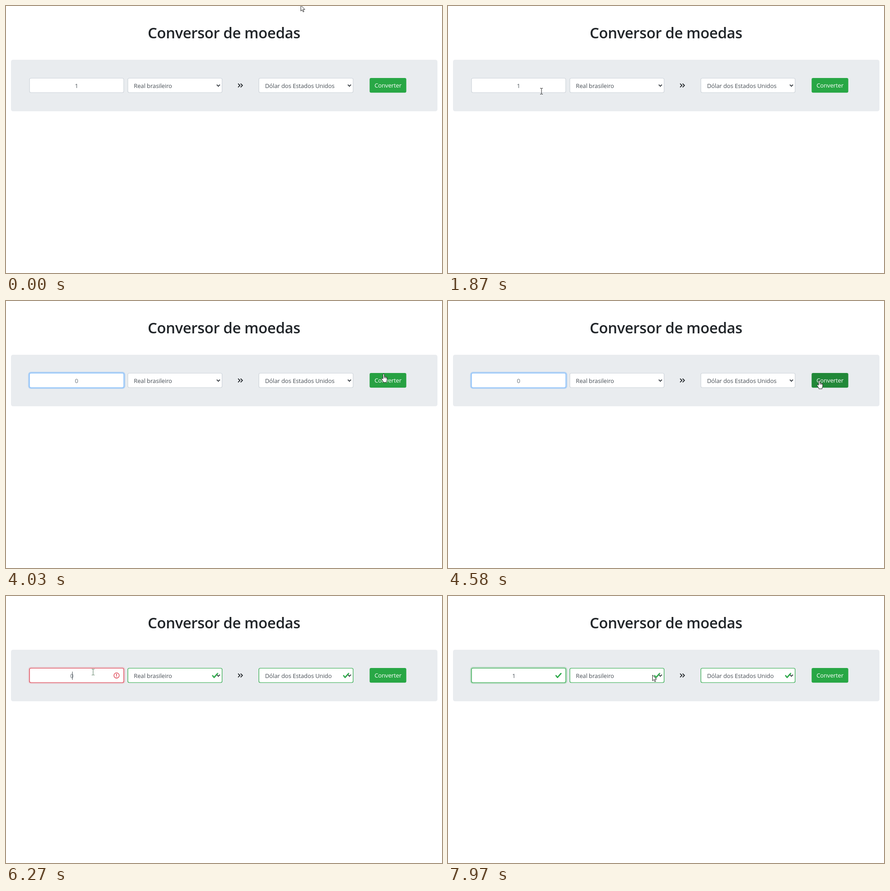
These frames come from a looping animation (956x586 px, 8000 ms). An HTML page:

```html
<!DOCTYPE html>
<html lang="pt-BR">
<head>
<meta charset="utf-8">
<title>Conversor de moedas</title>
<style>
html, body { margin: 0; width: 100%; height: 100%; overflow: hidden; background: #fff; }
svg { display: block; width: 100vw; height: 100vh; }
text { font: 13px "Open Sans", "Noto Sans", sans-serif; letter-spacing: -.13px; fill: #495057; }
.mid { text-anchor: middle; }
.title { font-size: 32.5px; font-weight: 550; letter-spacing: -.35px; fill: #212529; }
.hint { fill: #6c757d; }
.box { fill: #fff; stroke: #ced4da; stroke-width: 1.2; }
.line { fill: none; stroke: #343a40; stroke-width: 1.9; }
.halo { fill: none; stroke-width: 2.8; }

.anim, .hard { animation: 8s linear infinite; }
.hard { animation-timing-function: step-end; }

/* Form states: 1% is 80 ms */
.amount { animation-name: amount; }
@keyframes amount {
  0%, 25.9% { stroke: #ced4da; }
  28%, 57.2% { stroke: #80bdff; }
  59% { stroke: #ced4da; }
  60.7%, 88.4% { stroke: #dc3545; }
  90.3%, 100% { stroke: #28a745; }
}
.ring { animation-name: ring; }
@keyframes ring {
  0%, 25.9% { stroke: rgba(0,123,255,0); }
  28%, 57.2% { stroke: rgba(0,123,255,.25); }
  59% { stroke: rgba(0,123,255,0); }
  77.4% { stroke: rgba(220,53,69,0); }
  79%, 88.4% { stroke: rgba(220,53,69,.25); }
  90.3%, 100% { stroke: rgba(40,167,69,.25); }
}
.select { animation-name: select; }
@keyframes select {
  0%, 59% { stroke: #ced4da; }
  60.7%, 100% { stroke: #28a745; }
}
.button { fill: #28a745; animation-name: button; }
@keyframes button {
  0%, 50% { fill: #28a745; }
  52%, 57.2% { fill: #218838; }
  58.8% { fill: #1e7e34; }
  60.7%, 69% { fill: #218838; }
  70.9%, 100% { fill: #28a745; }
}
.glow { stroke: rgba(72,180,97,.5); animation-name: glow; }
@keyframes glow {
  0%, 57.2% { opacity: 0; }
  59.1%, 77.4% { opacity: 1; }
  78.3%, 100% { opacity: 0; }
}

/* Values and icons that switch at once */
.first { animation-name: first; }
@keyframes first { 0% { opacity: 1; } 42%, 100% { opacity: 0; } }
.empty { animation-name: empty; }
@keyframes empty { 0% { opacity: 0; } 42% { opacity: 1; } 59%, 100% { opacity: 0; } }
.invalid { animation-name: invalid; }
@keyframes invalid { 0% { opacity: 0; } 59% { opacity: 1; } 88.5%, 100% { opacity: 0; } }
.valid { animation-name: valid; }
@keyframes valid { 0% { opacity: 0; } 88.5%, 100% { opacity: 1; } }
.checked { animation-name: checked; }
@keyframes checked { 0% { opacity: 0; } 59%, 100% { opacity: 1; } }
.cut { animation-name: cut; }
@keyframes cut { 0% { fill-opacity: 1; } 59%, 100% { fill-opacity: 0; } }

.caret { fill: #495057; animation-name: caret; }
@keyframes caret {
  0% { opacity: 0; transform: translate(158px,166px); }
  26.5% { opacity: 1; transform: translate(158px,166px); }
  33.5% { opacity: 0; transform: translate(158px,166px); }
  39.25% { opacity: 1; transform: translate(158px,166px); }
  42% { opacity: 1; transform: translate(155px,166px); }
  47% { opacity: 0; transform: translate(155px,166px); }
  53.875% { opacity: 1; transform: translate(155px,166px); }
  57.25% { opacity: 0; transform: translate(145px,166px); }
  77.6% { opacity: 1; transform: translate(145px,166px); }
  84.375% { opacity: 0; transform: translate(145px,166px); }
  88.5% { opacity: 1; transform: translate(148px,166px); }
  95.5%, 100% { opacity: 0; transform: translate(148px,166px); }
}

/* Pointer */
.pointer { animation-name: move; }
@keyframes move {
  0% { transform: translate(646px,-2px); }
  15.5% { transform: translate(640px,4px); }
  16.375% { transform: translate(618px,20px); }
  17.25% { transform: translate(575px,52px); }
  18.125% { transform: translate(515px,92px); }
  19% { transform: translate(445px,130px); }
  19.875% { transform: translate(375px,163px); }
  20.75% { transform: translate(315px,186px); }
  21.625% { transform: translate(262px,197px); }
  22.5% { transform: translate(228px,193px); }
  23.375% { transform: translate(205px,187px); }
  24.25% { transform: translate(196px,181px); }
  25.125% { transform: translate(193px,178px); }
  44.5% { transform: translate(230px,240px); }
  45.375% { transform: translate(350px,385px); }
  46.25% { transform: translate(490px,403px); }
  47% { transform: translate(583px,176px); }
  49.5% { transform: translate(901px,172px); }
  50.375% { transform: translate(828px,160px); }
  51.25% { transform: translate(822px,164px); }
  52.125% { transform: translate(818px,169px); }
  53% { transform: translate(816px,172px); }
  53.875% { transform: translate(815px,174px); }
  54.75% { transform: translate(814px,174px); }
  69% { transform: translate(800px,215px); }
  69.875% { transform: translate(740px,300px); }
  70.75% { transform: translate(640px,375px); }
  71.625% { transform: translate(520px,393px); }
  72.5% { transform: translate(400px,350px); }
  73.375% { transform: translate(285px,262px); }
  74.25% { transform: translate(186px,182px); }
  75.125% { transform: translate(191px,167px); }
  91.125% { transform: translate(194px,171px); }
  92% { transform: translate(203px,181px); }
  92.875% { transform: translate(222px,197px); }
  93.75% { transform: translate(255px,209px); }
  94.625% { transform: translate(300px,214px); }
  95.5% { transform: translate(345px,213px); }
  96.25% { transform: translate(388px,209px); }
  97.125% { transform: translate(412px,192px); }
  97.875% { transform: translate(429px,178px); }
  98.75% { transform: translate(441px,175px); }
  99.625%, 100% { transform: translate(448px,173px); }
}
.arrow { animation-name: arrow; }
@keyframes arrow {
  0%, 44.5%, 69% { opacity: 1; }
  23.375%, 50.375%, 74.25% { opacity: 0; }
  92.875%, 100% { opacity: 1; }
}
.beam { fill: none; animation-name: beam; }
@keyframes beam {
  0% { opacity: 0; stroke: #222; }
  23.375% { opacity: 1; stroke: #222; }
  44.5% { opacity: 0; stroke: #222; }
  74.25% { opacity: 1; stroke: #557a5c; }
  92.875%, 100% { opacity: 0; stroke: #557a5c; }
}
.hand { animation-name: hand; }
@keyframes hand {
  0% { opacity: 0; }
  50.375% { opacity: 1; }
  69%, 100% { opacity: 0; }
}
.shape { fill: #fff; stroke: #222; stroke-linejoin: round; }
</style>
</head>
<body>
<svg viewBox="0 0 956 586">
  <defs>
    <path id="check" fill="#28a745" transform="scale(1.94)" d="M2.3 6.73L.6 4.53c-.4-1.04.46-1.4 1.1-.8l1.1 1.4 3.4-3.8c.6-.63 1.6-.27 1.2.7l-4 4.6c-.43.5-.8.4-1.1.1z"/>
    <path id="down" class="line" d="M-3.5-1.8L0 1.7l3.5-3.5"/>
  </defs>

  <text class="title mid" x="478" y="71">Conversor de moedas</text>
  <rect x="11" y="118" width="935" height="113" rx="4.3" fill="#e9ecef"/>

  <rect class="halo anim ring" x="50" y="157" width="210" height="34.4" rx="4.5"/>
  <rect class="box anim amount" x="51.6" y="158.5" width="206.6" height="31.5" rx="3"/>
  <text class="mid hard first" x="154.6" y="180">1</text>
  <text class="mid hint hard empty" x="154.6" y="180">0</text>
  <g class="hard invalid">
    <text class="mid hint" x="144.5" y="180">0</text>
    <g transform="translate(234.7 166.7) scale(1.29)" fill="none" stroke="#dc3545">
      <circle cx="6" cy="6" r="4.5"/>
      <path stroke-linejoin="round" d="M5.8 3.6h.4L6 6.5z"/>
      <circle cx="6" cy="8.2" r=".6" fill="#dc3545" stroke="none"/>
    </g>
  </g>
  <g class="hard valid">
    <text class="mid" x="144.5" y="180">1</text>
    <use href="#check" x="234.6" y="166.7"/>
  </g>
  <rect class="hard caret" width="1" height="18"/>

  <rect class="box anim select" x="267.2" y="158.5" width="206.6" height="31.5" rx="3"/>
  <text x="280.3" y="180">Real brasileiro</text>
  <use href="#down" x="465.6" y="174.5"/>
  <use class="hard checked" href="#check" x="450.7" y="166.7"/>

  <path class="line" style="stroke:#212529" d="M508.9 170.3l4 4-4 4M514.4 170.3l4 4-4 4"/>

  <rect class="box anim select" x="554.5" y="158.5" width="206.6" height="31.5" rx="3"/>
  <text x="568" y="180">Dólar dos Estados Unido<tspan class="hard cut">s</tspan></text>
  <use href="#down" x="753" y="174.5"/>
  <use class="hard checked" href="#check" x="738" y="166.7"/>

  <rect class="halo anim glow" x="796" y="156.8" width="83" height="34.8" rx="4.5"/>
  <rect class="anim button" x="797.3" y="158.1" width="80.4" height="32.2" rx="3.3"/>
  <text class="mid" x="837.5" y="179.4" style="fill:#fff">Converter</text>

  <g class="hard pointer">
    <path class="shape hard arrow" d="M.5.5v12.6l2.9-2.7 2.1 4.7 1.9-.9-2-4.5h4z"/>
    <path class="hard beam" d="M-3-6.5h2.2l.8.8.8-.8H3M0-6V6M-3 6.5h2.2l.8-.8.8.8H3"/>
    <path class="shape hard hand" d="M-1.4 11V1.3Q-1.4 0 0 0T1.4 1.3V6Q2.4 5 3.7 6.6 5 5.8 5.8 7.3 7.6 6.9 7.6 8.8V12.5Q7.5 15 6.2 16.3V18.8H-.9V16.8L-4.8 11.6Q-5.2 10-3.8 9.7-2.8 9.6-1.4 11zM1.4 6V9.4M3.7 6.6V9.6M5.8 7.3V10"/>
  </g>
</svg>
</body>
</html>
```
